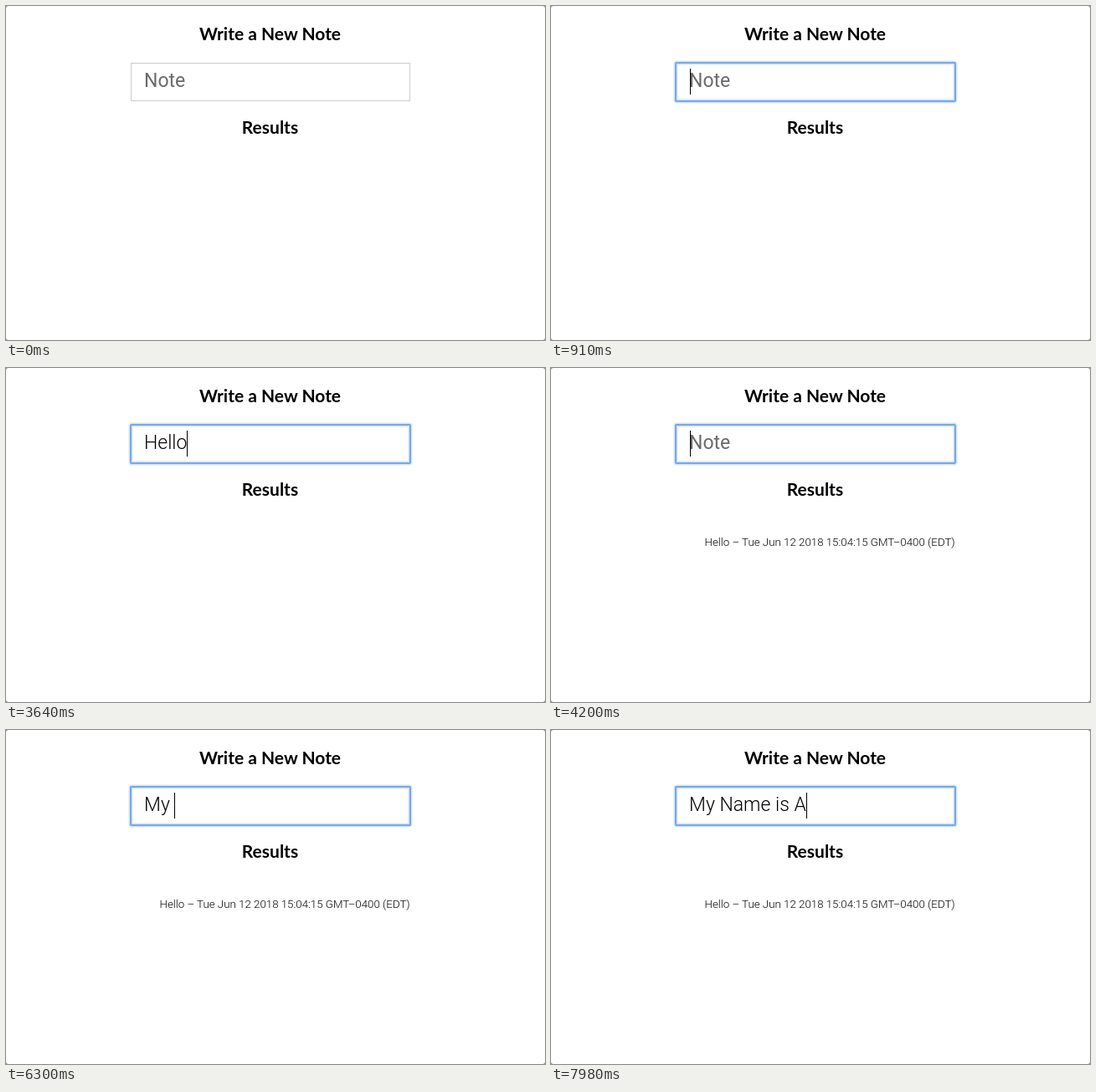
Recreate the animation shown at these times as an HTML page. Size 644 by 400 pixels, loop 8 s.

```html
<!DOCTYPE html>
<html lang="en">
<head>
<meta charset="utf-8">
<title>Write a New Note</title>
<style>
  html, body { margin: 0; width: 100%; height: 100%; overflow: hidden; background: #8a8a8a; }
  svg { display: block; width: 644px; height: 400px; }
  text { white-space: pre; font-family: Roboto, "Noto Sans", sans-serif; font-weight: 300; }
  .heading { font: 700 21px Lato, "Open Sans", sans-serif; text-anchor: middle; }
  .entry { font-size: 23px; }
  #placeholder { fill: #6a6a6a; font-weight: 400; }
  #result { font-size: 13.3px; }
  #ring rect { fill: none; }
</style>
</head>
<body>
<svg viewBox="0 0 644 400">
  <rect width="644" height="400" rx="3" fill="#fff"/>
  <text class="heading" x="315.5" y="41">Write a New Note</text>
  <text class="heading" x="315.5" y="153">Results</text>

  <rect x="149.5" y="68.5" width="333" height="45" fill="#fff" stroke="#ccc"/>
  <g id="ring">
    <rect x="149" y="68" width="334" height="46" rx="1.5" stroke="#d3e4f8" stroke-width="5"/>
    <rect x="149" y="68" width="334" height="46" rx="1" stroke="#76a9e6" stroke-width="2"/>
  </g>
  <text class="entry" id="placeholder" x="165" y="97">Note</text>
  <text class="entry" id="typed" x="165" y="97"></text>
  <rect id="caret" y="75" width="1" height="31"/>

  <text id="result" x="183.5" y="213">Hello – Tue Jun 12 2018 15:04:15 GMT–0400 (EDT)</text>
</svg>
<script>
  const LOOP = 8000, FOCUS = 910, SUBMIT = 4130, TEXT_X = 165;
  const [ring, placeholder, typed, caret, result] =
    ['ring', 'placeholder', 'typed', 'caret', 'result'].map(id => document.getElementById(id));

  // Each entry types one more character of its phrase.
  const phrases = [
    { text: 'Hello', from: 0, keys: [2520, 2940, 3220, 3430, 3640] },
    { text: 'My Name is A', from: SUBMIT,
      keys: [5810, 5950, 6300, 6650, 6790, 6930, 7070, 7210, 7420, 7560, 7700, 7980] }
  ];
  // The caret flips at each of these times, starting hidden.
  const caretFlips = [FOCUS, 1330, 1890, 2380, 2520, 4690, 5180, 5740, 5810];

  const countPassed = (times, t) => times.filter(time => time <= t).length;
  const show = (node, visible) => node.setAttribute('visibility', visible ? 'visible' : 'hidden');

  function draw(t) {
    const phrase = phrases[t < SUBMIT ? 0 : 1];
    const value = phrase.text.slice(0, countPassed(phrase.keys, t));
    if (typed.textContent !== value) typed.textContent = value;

    const width = value ? typed.getComputedTextLength() : 1;
    caret.setAttribute('x', Math.round(TEXT_X + width));
    show(caret, countPassed(caretFlips, t) % 2);
    show(placeholder, !value);
    show(ring, t >= FOCUS);
    show(result, t >= SUBMIT);
  }

  function tick() {
    draw(performance.now() % LOOP);
    requestAnimationFrame(tick);
  }
  tick();
</script>
</body>
</html>
```
